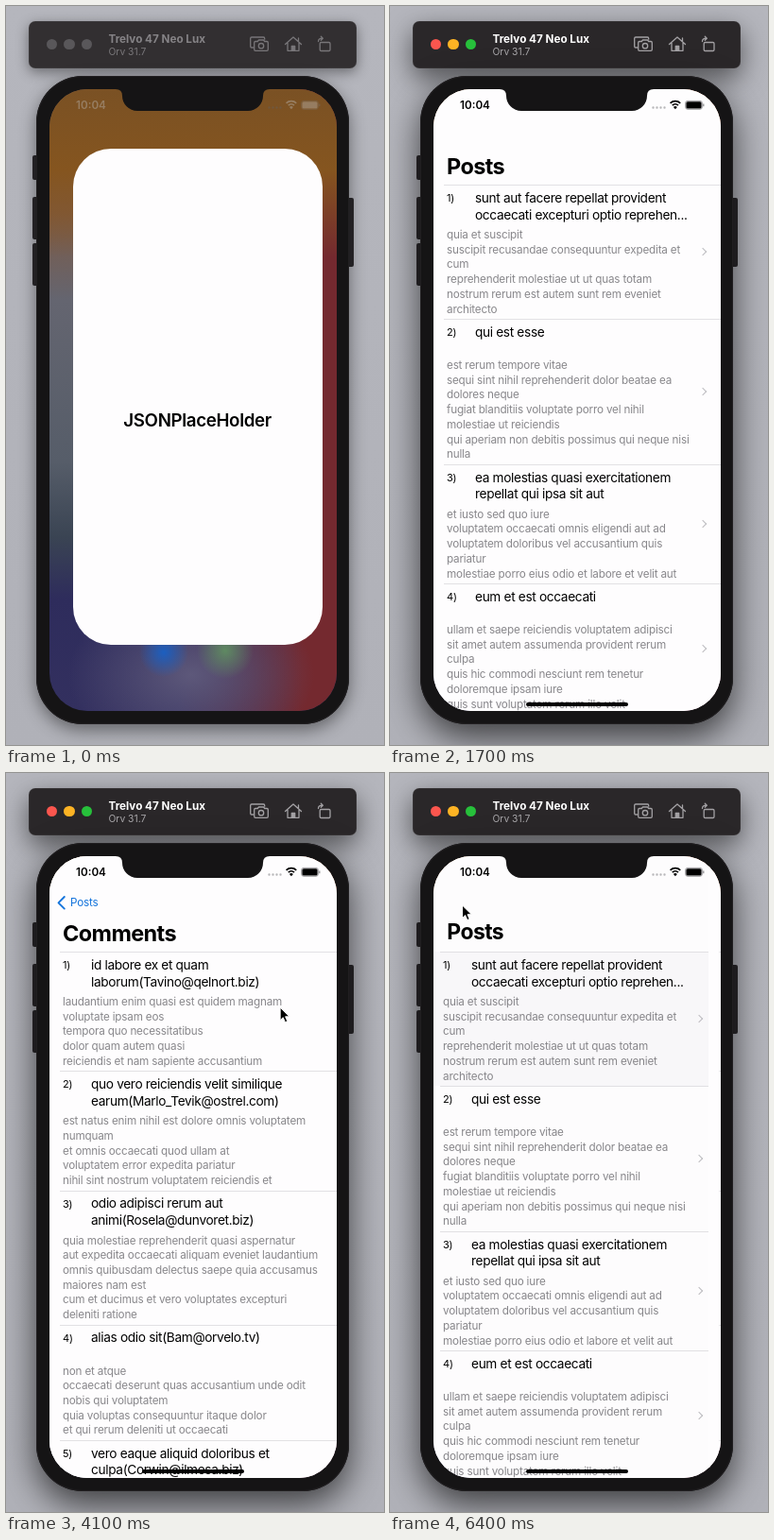
An HTML page that plays this animation: 400x782 px, repeating every 6500 ms.

```html
<!DOCTYPE html>
<html lang="en">
<head>
<meta charset="utf-8">
<title>Posts and comments</title>
<style>
html, body { margin: 0; width: 100%; height: 100%; overflow: hidden; }
body { position: relative; background: linear-gradient(#b5b6bd, #b0b1b8); font-family: Inter, Roboto, sans-serif; }
div, svg { position: absolute; }
.full { left: 0; top: 0; width: 400px; height: 782px; }
.t { white-space: pre; height: 20px; line-height: 20px; color: #000; }

#bar { left: 24px; top: 16px; width: 347px; height: 50px; border-radius: 7px; background: #322f31;
  box-shadow: 0 4px 14px rgba(0,0,0,.42), inset 0 0 0 .5px rgba(255,255,255,.1); }
#name { left: 84.5px; top: 8.5px; font-size: 11.7px; font-weight: 700; color: #858386; }
#os { left: 84.5px; top: 22px; font-size: 10.3px; color: #79777a; }
.dot { top: 18.8px; width: 11.4px; height: 11.4px; border-radius: 50%; background: #59575a; }
.on #bar { background: #2a2729; box-shadow: 0 10px 28px rgba(0,0,0,.55), inset 0 0 0 .5px rgba(255,255,255,.1); }
.on #name { color: #fff; }
.on #os { color: #a9a7aa; }
.on .dot { background: var(--c); }
#icons { color: #787679; }
.on #icons { color: #a3a1a4; }

.key { width: 8px; background: #2b292c; border-radius: 2px; }
#body { left: 32px; top: 74px; width: 331px; height: 686px; border-radius: 49px; background: #151415;
  box-shadow: 0 6px 18px rgba(0,0,0,.45), inset 0 0 0 1px #211f21; }
.on #body { box-shadow: 0 14px 36px rgba(0,0,0,.66), inset 0 0 0 1px #211f21; }

#screen { clip-path: inset(88px 50px 36px 46px round 40px); }
#wall { left: 46px; top: 88px; width: 304px; height: 658px; background:
  radial-gradient(circle at 121px 596px, #1c5fc0, transparent 26px),
  radial-gradient(circle at 186px 594px, #5f8a62, transparent 30px),
  radial-gradient(ellipse 130px 90px at 150px 620px, #5d587a, transparent),
  linear-gradient(#7a5124, #85551f 13%, transparent 27%),
  linear-gradient(90deg, transparent 45%, #74292f 88%),
  linear-gradient(#7d5a45 20%, #646570 34%, #565d69 60%, #3a4453 72%, #2e2c5c 82%, #33305f); }
#app, .pane, #page { background: #fefdfe; }
#app { overflow: hidden; border-radius: 40px; }
#splash { width: 304px; height: 658px; transform-origin: 0 0; }
#splash .t { left: 0; width: 303px; top: 320px; text-align: center; font-size: 21.6px; font-weight: 600; letter-spacing: -.42px; }
#page, .pane, #shade { left: 46px; top: 88px; width: 304px; height: 658px; }
#shade { background: #000; }
.head { font-size: 13.7px; letter-spacing: -.35px; }
.text { font-size: 11.7px; letter-spacing: -.18px; color: #88878b; }
.num { font-size: 11px; letter-spacing: -.2px; }
.line { left: 11px; right: 0; height: 1px; background: #e2e1e4; }
.big { font-size: 23.5px; font-weight: 700; letter-spacing: -.62px; transform-origin: 0 50%; }
#hit { left: 0; top: 101px; width: 304px; height: 142px; background: #d1d0d5; }
#back { left: 68px; top: 127px; font-size: 11.7px; letter-spacing: -.2px; color: #1474dc; transform-origin: 0 50%; }
#clock { left: 74px; top: 95px; font-size: 11.7px; font-weight: 600; }
#status { filter: invert(.75); }
.on #status { filter: none; }
</style>
</head>
<body>
<div id="bar">
  <div class="dot" style="left:18.8px;--c:#fb564e"></div>
  <div class="dot" style="left:37.3px;--c:#fcb324"></div>
  <div class="dot" style="left:55.8px;--c:#27c03b"></div>
  <div id="name" class="t">Trelvo 47 Neo Lux</div>
  <div id="os" class="t">Orv 31.7</div>
</div>
<svg id="icons" class="full" viewBox="0 0 400 782" fill="none" stroke="currentColor" stroke-width="1.3" stroke-linejoin="round" stroke-linecap="round">
  <path d="M261.5 44h-1.5q-1.3 0-1.3-1.3V34.3q0-1.3 1.3-1.3h12.4q1.3 0 1.3 1.3v.9"/>
  <path d="M264 37.5h2.3l1.2-1.5h5l1.2 1.5h2.3q1.3 0 1.3 1.3v7.2q0 1.3-1.3 1.3h-12q-1.3 0-1.3-1.3v-7.2q0-1.3 1.3-1.3z"/>
  <circle cx="270" cy="42.2" r="2.7"/>
  <path d="M295.5 40.5L304 33l8.5 7.5M298 39v8.3h12V39M309.5 34v3"/>
  <path d="M302.3 47v-4.5h3.4V47z" fill="currentColor"/>
  <path d="M333.5 38.5h8.2q1.3 0 1.3 1.3v6.4q0 1.3-1.3 1.3h-8.2q-1.3 0-1.3-1.3v-6.4q0-1.3 1.3-1.3zM330.5 37.5q0-3.3 4.5-3.3M333.3 32.3l2 1.9-2 2"/>
</svg>
<div class="key" style="left:27.5px;top:158px;height:26px"></div>
<div class="key" style="left:27.5px;top:202px;height:45px"></div>
<div class="key" style="left:27.5px;top:251px;height:45px"></div>
<div class="key" style="left:359.5px;top:203px;height:73px"></div>
<div id="body"></div>

<div id="screen" class="full">
  <div id="wall"></div>
  <div id="page">
    <div id="posts" class="pane" style="left:0;top:0"><div id="hit"></div></div>
  </div>
  <div id="shade"></div>
  <div id="comments" class="pane"></div>
  <div id="nav" class="full">
    <div id="large" class="t big" style="left:60px;top:160px">Posts</div>
    <svg id="chev" class="full" viewBox="0 0 400 782"><path d="M61.8 131l-6.3 6.3 6.3 6.3" fill="none" stroke="#1474dc" stroke-width="1.9" stroke-linecap="round" stroke-linejoin="round"/></svg>
    <div id="back" class="t">Posts</div>
  </div>
  <div id="status" class="full">
    <div id="clock" class="t">10:04</div>
    <svg class="full" viewBox="0 0 400 782" fill="none" stroke="#000">
      <path d="M278.5 107.5h12.2" stroke="#b9b8bb" stroke-width="2.4" stroke-linecap="round" stroke-dasharray="0 4"/>
      <path d="M296.6 102.8a7.5 7.5 0 0 1 10.6 0M298.8 105.1a4.4 4.4 0 0 1 6.2 0" stroke-width="1.8"/>
      <path d="M301.9 109.3l-2-2.2a2.8 2.8 0 0 1 4 0z" fill="#000" stroke="none"/>
      <rect x="312.6" y="100.4" width="17.8" height="8.9" rx="2.4" stroke="#8b8a8d" stroke-width=".8"/>
      <rect x="313.4" y="101.2" width="16.2" height="7.3" rx="1.6" fill="#000" stroke="none"/>
      <path d="M331.8 103.4v2.9" stroke="#8b8a8d" stroke-width="1.2"/>
    </svg>
  </div>
  <div id="app"><div id="splash"><div class="t">JSONPlaceHolder</div></div></div>
  <div id="home" style="left:143.5px;top:737px;width:108.5px;height:4px;border-radius:2px;background:#000"></div>
</div>
<svg class="full" viewBox="0 0 400 782">
  <path d="M116 86V88Q123 88 123 95A16 16 0 0 0 139 111H256A16 16 0 0 0 272 95Q272 88 279 88V86Z" fill="#151415"/>
  <path id="mouse" d="M0 0V13.5L3.1 10.6 5.3 15.6 7.7 14.5 5.5 9.7H9.8Z" fill="#000" stroke="#fff" stroke-width="1" stroke-linejoin="round"/>
</svg>

<script>
const $ = id => document.getElementById(id);
const clamp = v => Math.min(1, Math.max(0, v));

// Each entry: heading lines, then body lines.
const POSTS = [
  ['sunt aut facere repellat provident|occaecati excepturi optio reprehen...',
   'quia et suscipit|suscipit recusandae consequuntur expedita et|cum|reprehenderit molestiae ut ut quas totam|nostrum rerum est autem sunt rem eveniet|architecto'],
  ['qui est esse',
   'est rerum tempore vitae|sequi sint nihil reprehenderit dolor beatae ea|dolores neque|fugiat blanditiis voluptate porro vel nihil|molestiae ut reiciendis|qui aperiam non debitis possimus qui neque nisi|nulla'],
  ['ea molestias quasi exercitationem|repellat qui ipsa sit aut',
   'et iusto sed quo iure|voluptatem occaecati omnis eligendi aut ad|voluptatem doloribus vel accusantium quis|pariatur|molestiae porro eius odio et labore et velit aut'],
  ['eum et est occaecati',
   'ullam et saepe reiciendis voluptatem adipisci|sit amet autem assumenda provident rerum|culpa|quis hic commodi nesciunt rem tenetur|doloremque ipsam iure|quis sunt voluptatem rerum illo velit']
];
const COMMENTS = [
  ['id labore ex et quam|laborum(Tavino@qelnort.biz)',
   'laudantium enim quasi est quidem magnam|voluptate ipsam eos|tempora quo necessitatibus|dolor quam autem quasi|reiciendis et nam sapiente accusantium'],
  ['quo vero reiciendis velit similique|earum(Marlo_Tevik@ostrel.com)',
   'est natus enim nihil est dolore omnis voluptatem|numquam|et omnis occaecati quod ullam at|voluptatem error expedita pariatur|nihil sint nostrum voluptatem reiciendis et'],
  ['odio adipisci rerum aut|animi(Rosela@dunvoret.biz)',
   'quia molestiae reprehenderit quasi aspernatur|aut expedita occaecati aliquam eveniet laudantium|omnis quibusdam delectus saepe quia accusamus|maiores nam est|cum et ducimus et vero voluptates excepturi|deleniti ratione'],
  ['alias odio sit(Bam@orvelo.tv)',
   'non et atque|occaecati deserunt quas accusantium unde odit|nobis qui voluptatem|quia voluptas consequuntur itaque dolor|et qui rerum deleniti ut occaecati'],
  ['vero eaque aliquid doloribus et|culpa(Corwin@ilmesa.biz)', '']
];

function add(parent, cls, style, text = '') {
  const el = document.createElement('div');
  el.className = cls;
  el.style.cssText = style;
  el.textContent = text;
  parent.append(el);
  return el;
}

// Coordinates are inside the pane; y is the middle of a text line.
function buildList(pane, rows, arrows) {
  const list = add(pane, '', 'left:0;top:0;width:304px;height:658px');
  const put = (cls, x, y, s) => add(list, 't ' + cls, `left:${x}px;top:${y - 10}px`, s);
  let top = 101;
  rows.forEach(([head, body], i) => {
    const heads = head.split('|'), lines = body.split('|');
    const first = heads.length > 1 ? 53 : 49;
    const height = first + (lines.length - 1) * 15.7 + 10.5;
    add(list, 'line', `top:${Math.round(top)}px`);
    put('num', 14, top + 14, i + 1 + ')');
    heads.forEach((s, k) => put('head', 44, top + 13.8 + k * 17.7, s));
    lines.forEach((s, k) => put('text', 14, top + first + k * 15.7, s));
    if (arrows) add(list, '', `left:282px;top:${top + height / 2 - 3}px;width:5px;height:5px;
      border:solid #bdbcc0;border-width:1.5px 1.5px 0 0;transform:rotate(45deg)`);
    top += height;
  });
  return list;
}
const postList = buildList($('posts'), POSTS, true);
buildList($('comments'), COMMENTS, false);
const commentTitle = add($('comments'), 't big', 'left:14px;top:72px', 'Comments');

// Pointer path: time, x, y.
const PATH = [
  [2800, 391, 358], [2900, 352, 310], [3000, 320, 274], [3100, 305, 262], [3400, 291, 249],
  [4200, 290, 248], [4400, 285, 292], [4600, 274, 362], [4700, 272, 370], [4800, 270, 366],
  [5000, 205, 275], [5200, 102, 138], [5300, 84, 119], [5500, 79, 127], [5800, 76.5, 140], [6500, 76.5, 140]
];
function pointer(t) {
  const i = Math.max(1, PATH.findIndex(p => p[0] >= t));
  const [t0, x0, y0] = PATH[i - 1], [t1, x1, y1] = PATH[i];
  const k = clamp((t - t0) / (t1 - t0));
  return [x0 + (x1 - x0) * k, y0 + (y1 - y0) * k];
}

// Critically damped spring from 0 to 1.
function spring(ms) {
  const a = Math.max(0, ms) * 0.0154;
  return 1 - (1 + a) * Math.exp(-a);
}
const show = (el, v) => { el.style.opacity = v; };
const slide = (el, x) => { el.style.transform = `translateX(${Math.round(x)}px)`; };

function drawLaunch(t) {
  const k = t < 500 ? Math.exp(-t / 80) : 0;
  const left = 46 + 25 * k, top = 88 + 63 * k, width = 304 - 40 * k;
  Object.assign($('app').style, {
    left: left + 'px', top: top + 'px', width: width + 'px', height: 658 - 133 * k + 'px'
  });
  $('splash').style.transform = `scale(${width / 304})`;
  const out = clamp((t - 600) / 300);
  show($('app'), 1 - out);
  show($('status'), t < 600 ? Math.max(0, 0.4 - t / 400) : out);
  show($('home'), t < 200 ? 0 : 1);
  for (const id of ['page', 'shade', 'nav', 'comments'])
    $(id).style.visibility = t < 600 ? 'hidden' : 'visible';
}

function drawPush(t) {
  const leaving = t > 6080;
  const p = leaving ? 1 - spring(t - 6080) : spring(t - 3520);
  const rest = 1 - p;
  slide($('posts'), -91.2 * p);
  slide($('comments'), 304 * rest);
  show($('shade'), 0.1 * p);
  show($('hit'), t < 3500 ? 0 : leaving ? clamp(p * 2.5) : 1);
  show(commentTitle, leaving ? p : clamp((p - 0.955) / 0.04));
  show($('chev'), clamp((p - 0.9) / 0.08));

  // The large title shrinks into the back label.
  const fade = clamp(1.4 - 2 * p);
  $('large').style.transform = `translate(${8 * p}px,${-33 * p}px) scale(${1 - 0.52 * p})`;
  $('back').style.transform = `translate(${-8 * rest}px,${33 * rest}px) scale(${1 + 1.08 * rest})`;
  show($('large'), fade);
  show($('back'), 1 - fade);
}

function draw() {
  const t = Math.floor(performance.now() % 6500 / 100) * 100;
  document.body.classList.toggle('on', t >= 800);
  drawLaunch(t);
  drawPush(t);
  show(postList, t < 1400 ? 0 : 1);
  const [x, y] = pointer(t);
  $('mouse').setAttribute('transform', `translate(${x} ${y})`);
  show($('mouse'), t < 2800 ? 0 : 1);
  requestAnimationFrame(draw);
}
draw();
</script>
</body>
</html>
```
